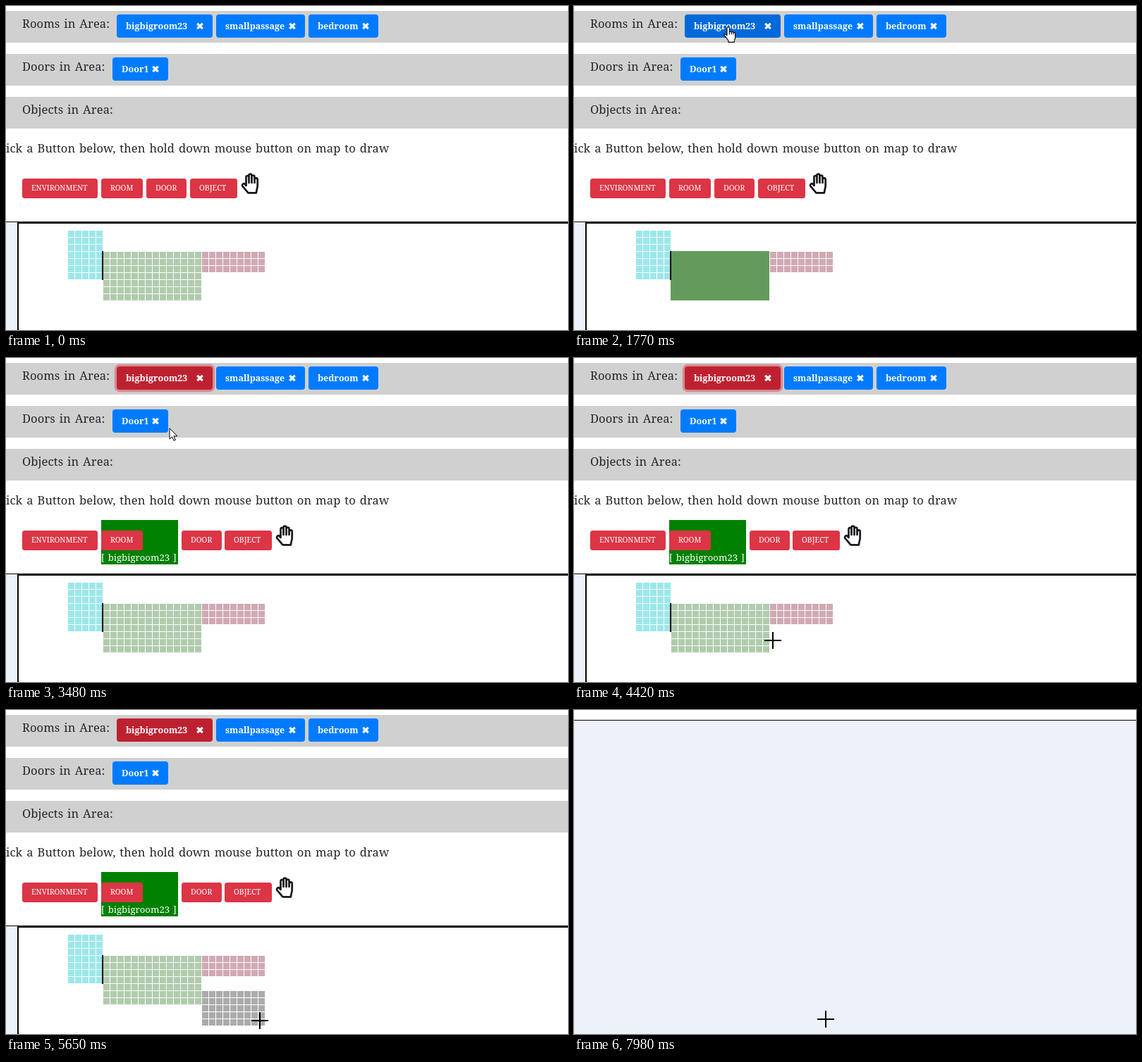
Recreate the animation shown at these times as an HTML page. Size 797 px wide and 460 px high, loop 8 s.

```html
<!DOCTYPE html>
<html lang="en">
<head>
<meta charset="utf-8">
<title>Map editor</title>
<style>
  html, body { margin: 0; width: 100%; height: 100%; overflow: hidden; background: #fff; }
  svg { display: block; width: 797px; height: 460px; font-family: "Noto Serif", serif; }
  text { white-space: pre; }
  .label { font-size: 16.5px; fill: #212529; letter-spacing: .1px; word-spacing: 1.5px; }
  .tag { font-size: 12.5px; font-weight: 700; fill: #fff; }
  .tool { font-size: 10.6px; fill: #fff; }
  .picked { font-size: 13.2px; fill: #fff; word-spacing: 1.5px; }
  .crisp { shape-rendering: crispEdges; }
</style>
</head>
<body>
<svg id="stage" viewBox="0 0 797 460"></svg>
<script>
const LOOP = 8000;
const BLUE = [0, 123, 255], HOVER = [0, 105, 217], ACTIVE = [0, 98, 204], RED = [189, 33, 48];

const rect = (x, y, w, h, fill, extra = '') =>
  `<rect x="${x}" y="${y}" width="${w}" height="${h}" fill="${fill}" ${extra}/>`;
const text = (cls, x, y, s) => `<text class="${cls}" x="${x}" y="${y}">${s}</text>`;

const tag = (x, y, w, name, id = '') =>
  rect(x, y, w, 33, '#007bff', `rx="4" id="${id}"`) +
  text('tag', x + 13, y + 21, name) +
  `<path d="M${x + w - 21.7} ${y + 12.8}l7.4 7.4m0-7.4l-7.4 7.4" stroke="#fff" stroke-width="3.2"/>`;

const tool = (x, w, name) =>
  rect(x, 245, w, 28, '#dc3545', 'rx="3.5"') + text('tool', x + 13, 262, name);

// Cells of 9px on a 10px pitch
function cells(x, y, cols, rows) {
  let d = '';
  for (let r = 0; r < rows; r++)
    for (let c = 0; c < cols; c++) d += `M${x + c * 10} ${y + r * 10}h9v9h-9z`;
  return d;
}
const room = (x, y, cols, rows, fill, id = '') =>
  `<path id="${id}" class="crisp" fill="${fill}" d="${cells(x, y, cols, rows)}"/>`;

const palm = `<path fill="none" stroke="#16181d" stroke-width="2.7" stroke-linejoin="round" stroke-linecap="round"
  transform="translate(333 237)" d="M7.5 18V6a2 2 0 0 1 4 0V14M11.5 13V3.6a2 2 0 0 1 4 0V14M15.5 13V5.5
  a2 2 0 0 1 4 0V14M19.5 13V9.5a2.1 2.1 0 0 1 4.2 0V18q0 3-.9 5l-1 5.4H10.5L2.3 18.6a2.3 2.3 0 0 1 3.6-2.7L7.5 18"/>`;

const editor = [7, 68, 129].map(y => rect(0, y, 797, 45, '#d0d0d0')).join('') +
  text('label', 23, 31, 'Rooms in Area:') +
  text('label', 23, 92, 'Doors in Area:') +
  text('label', 23, 153, 'Objects in Area:') +
  text('label', 0, 208, 'ick a Button below, then hold down mouse button on map to draw') +
  rect(155.4, 10.4, 139.2, 36.2, 'none', 'id="ring" rx="5.5" stroke="#e15361" stroke-opacity=".55" stroke-width="3.2"') +
  tag(157, 12, 136, 'bigbigroom23', 'roomTag') +
  tag(298, 12, 126, 'smallpassage') +
  tag(429, 12, 99, 'bedroom') +
  tag(151, 73, 79, 'Door1') +
  `<g id="picked">${rect(135, 230, 109, 63, 'green')}${text('picked', 135, 288, '[ bigbigroom23 ]')}</g>` +
  tool(23, 107, 'ENVIRONMENT') +
  tool(135, 59, 'ROOM') +
  `<g id="doorTool">${tool(199, 57, 'DOOR')}</g>` +
  `<g id="lastTools">${tool(261, 67, 'OBJECT')}${palm}</g>` +
  `<g class="crisp">${rect(0, 307, 16, 153, '#edf2fa')}${rect(0, 306, 797, 1, '#000')}` +
  `${rect(16, 307, 781, 2, '#000')}${rect(16, 307, 2, 153, '#000')}</g>` +
  room(88, 319, 5, 7, '#9be7eb') +
  room(138, 349, 14, 7, '#b0cbad') +
  room(278, 349, 9, 3, '#d1a9b3') +
  room(0, 0, 0, 0, '#ababab', 'drawn') +
  rect(137, 348, 140, 70, '#639b5d', 'id="glow"') +
  rect(136, 348, 2, 41, '#000');

const scrolled = rect(0, 0, 797, 460, '#fff') + rect(0, 14, 797, 1, '#000') + rect(0, 15, 797, 445, '#edf2fa');

const pointers = `
  <g id="arrow"><path fill="#fff" stroke="#000" d="M.5 .5V16L4 12.6 6.4 18 8.8 17 6.4 11.7H11.4Z"/></g>
  <g id="hand"><path fill="#fff" stroke="#000" stroke-width="1.1" stroke-linejoin="round" transform="translate(-7 -1)"
    d="M5.5 13V2.3a1.7 1.7 0 0 1 3.4 0V8a1.6 1.6 0 0 1 2.9.4a1.6 1.6 0 0 1 2.8.6a1.5 1.5 0 0 1 2.6 1V15
    q0 2.5-1.4 4.5V22.4H7.5V20Q5 17 3.2 14.4Q.8 12.5 1.5 11.2Q3 10.2 5.5 13M8.9 8v3.4M11.8 8.4v3M14.6 9v2.6"/></g>
  <path id="cross" class="crisp" d="M-12-1h24v2h-24zM-1-12h2v24h-2z"/>`;

const stage = document.getElementById('stage');
stage.innerHTML = `<g id="editor">${editor}</g><g id="scrolled">${scrolled}</g>${pointers}`;
const el = {};
stage.querySelectorAll('[id]').forEach(n => { if (n.id) el[n.id] = n; });

// Stepped pointer moves: start, end, steps, then 2 or 4 curve points
const moves = [
  [520, 1310, 10, [671, 450], [300, 330], [-50, 110], [222, 38]],
  [1310, 1540, 3, [222, 38], [218, 31]],
  [1690, 1770, 1, [218, 31], [218.5, 30]],
  [3253, 4100, 11, [218.5, 30], [225, 120], [345, 450], [286, 409]],
  [4100, 4420, 4, [286, 409], [282, 401]],
  [4780, 5510, 9, [282, 401], [360, 441]],
  [7210, 7290, 1, [360, 441], [359, 440]],
  [7360, 7440, 1, [359, 440], [358, 440]],
  [7820, 7900, 1, [358, 440], [358, 439]],
  [7900, 7980, 1, [358, 439], [357, 439]]
];

const lerp = (a, b, f) => a.map((v, i) => v + (b[i] - v) * f);
function curve(points, f) {
  while (points.length > 1) points = points.slice(1).map((p, i) => lerp(points[i], p, f));
  return points[0];
}

function pointerAt(t) {
  const move = moves.filter(m => t >= m[0]).pop();
  if (!move) return null;
  const [start, end, steps, ...points] = move;
  const step = Math.floor((t - start) / (end - start) * steps + 1e-6);
  return curve(points, Math.min(1, step / steps));
}

function tagColor(t) {
  if (t < 1390) return BLUE;
  if (t < 1540) return lerp(BLUE, HOVER, t < 1465 ? .4 : .8);
  if (t < 2320) return HOVER;
  if (t < 2470) return ACTIVE;
  return t < 2550 ? lerp(ACTIVE, RED, .5) : RED;
}

const show = (node, on) => node.setAttribute('display', on ? 'inline' : 'none');

let drawnSize = '';
function setDrawn(cols, rows) {
  const size = cols + 'x' + rows;
  if (size === drawnSize) return;
  drawnSize = size;
  el.drawn.setAttribute('d', cells(278, 399, cols, rows));
}

function draw(t) {
  const pos = pointerAt(t);
  const away = t >= 7210;
  const selected = t >= 2470;
  show(el.editor, !away);
  show(el.scrolled, away);

  let kind = '', over = false;
  if (pos) {
    const [x, y] = pos;
    over = x > 157 && x < 293 && y > 12 && y < 45;
    kind = over ? 'hand' : selected && y > 309 ? 'cross' : 'arrow';
    const at = kind === 'cross' ? pos.map(Math.round) : pos;
    el[kind].setAttribute('transform', `translate(${at})`);
  }
  for (const k of ['arrow', 'hand', 'cross']) show(el[k], k === kind);

  show(el.glow, over);
  show(el.ring, selected && t < 4780);
  show(el.picked, selected);
  el.roomTag.setAttribute('fill', `rgb(${tagColor(t).map(Math.round)})`);
  el.doorTool.setAttribute('transform', `translate(${selected ? 50 : 0})`);
  el.lastTools.setAttribute('transform', `translate(${selected ? 49 : 0})`);

  if (t < 4780) setDrawn(0, 0);
  else {
    const cols = Math.floor((pos[0] - 278) / 10) + 1;
    const rows = Math.floor((pos[1] - 399) / 10) + 1;
    setDrawn(t < 5650 ? Math.min(8, cols) : 9, rows);
  }
}

const begin = performance.now();
function tick() {
  draw((performance.now() - begin) % LOOP);
  requestAnimationFrame(tick);
}
tick();
</script>
</body>
</html>
```
